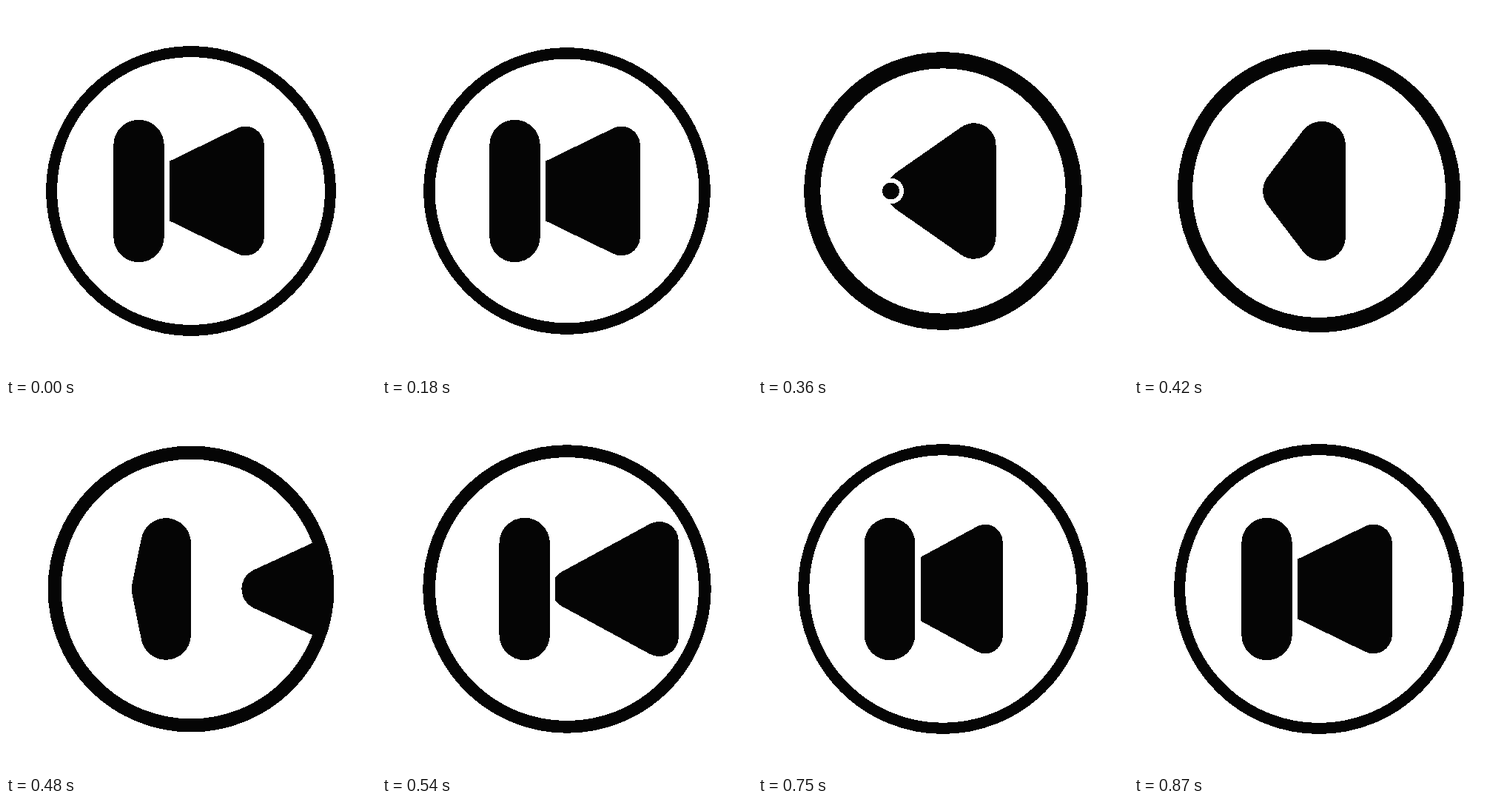
Write an HTML page that moves like this. It is 500 px wide and 500 px high and loops after 1.08 s.

```html
<!DOCTYPE html>
<html lang="en">
<head>
<meta charset="utf-8">
<title>Previous button</title>
<style>
  html, body { margin: 0; width: 100%; height: 100%; overflow: hidden; background: #fff; }
  svg { display: block; width: 100%; height: 100%; shape-rendering: crispEdges; }
  path { stroke-linejoin: round; stroke-linecap: round; }
  .ink { fill: #050505; stroke: #050505; }
  .gap { fill: #fff; stroke: #fff; }
  #ring { fill: none; stroke: #050505; }
</style>
</head>
<body>
<svg viewBox="0 0 500 500">
  <clipPath id="inside"><circle id="hole" cx="250" cy="250" r="188"/></clipPath>
  <g clip-path="url(#inside)">
    <path id="next" class="ink"/>
    <path id="morphGap" class="gap"/>
    <path id="morph" class="ink"/>
    <path id="barGap" class="gap"/>
    <path id="bar" class="ink"/>
  </g>
  <circle id="ring" cx="250" cy="250" r="188.5" stroke-width="15"/>
</svg>
<script>
const LOOP = 1080, STEP = 30, MID = 250, HALF = 62, GAP = 7.5;
const BAR_X = 179.5, BAR_R = 34.2, TIP_X = 196, LENGTH = 127.5, TIP_R = 25.3;
const $ = id => document.getElementById(id);

const part = (t, a, b) => Math.min(1, Math.max(0, (t - a) / (b - a)));
const smooth = (t, a, b) => { const u = part(t, a, b); return u * u * (3 - 2 * u); };
const mix = (a, b, u) => a + (b - a) * u;

// Fast rise and slow decay, reaching 1 at start + rise.
function pulse(t, start, rise, power) {
  const x = Math.max(0, t - start) / rise;
  return (x * Math.exp(1 - x)) ** power;
}

// Rounded triangle; with tip and back together it is a bar.
function shape(id, tip, back, half, r) {
  const el = $(id);
  el.setAttribute("d", `M${tip} ${MID}L${back} ${MID - half}V${MID + half}Z`);
  el.setAttribute("stroke-width", 2 * r);
}

function solid(id, tip, back, half, r) {
  shape(id + "Gap", tip, back, half, r + Math.min(GAP, r * 0.52));
  shape(id, tip, back, half, r);
}

function drawRing(t) {
  const r = 188.5 - 15.1 * pulse(t, 150, 138, 2.5);
  $("ring").setAttribute("r", r);
  $("ring").setAttribute("stroke-width", 15 + 7.9 * pulse(t, 150, 165, 3));
  $("hole").setAttribute("r", r);
}

// The old bar collapses to a dot and vanishes.
function drawBar(t) {
  const reach = (HALF + BAR_R) * (1 - smooth(t, 178, 410));
  const r = Math.min(BAR_R, reach);
  solid("bar", BAR_X, BAR_X, reach - r, r);
}

// The triangle folds flat into the new bar, swaying right on the way.
function drawMorph(t, settle) {
  const sway = 11 * Math.sin(Math.PI * part(t, 280, 640));
  const tip = mix(TIP_X, BAR_X - 2.5, smooth(t, 430, 620)) + sway + 2.5 * settle;
  const length = LENGTH * (1 - smooth(t, 260, 533));
  solid("morph", tip, tip + length, HALF, mix(TIP_R, BAR_R, smooth(t, 200, 520)));
}

// A fresh triangle slides in, squeezes against the bar and relaxes.
function drawNext(t, settle) {
  const left = 1 - part(t, 379, 655);
  const tip = mix(TIP_X - 10, TIP_X, settle) + 400 * left ** 2;
  const length = mix(LENGTH - 17, LENGTH, settle) + 118 * left ** 3;
  const r = mix(TIP_R - 2.8, TIP_R, settle) + 9.3 * left;
  shape("next", tip, tip + length, mix(HALF + 2.7, HALF, settle), r);
}

function draw(t) {
  const settle = smooth(t, 660, 870);
  drawRing(t);
  drawNext(t, settle);
  drawMorph(t, settle);
  drawBar(t);
}

const start = performance.now();
function tick(now) {
  const t = Math.max(0, now - start) % LOOP;
  draw(Math.floor(t / STEP) * STEP);
  requestAnimationFrame(tick);
}
draw(0);
requestAnimationFrame(tick);
</script>
</body>
</html>
```
